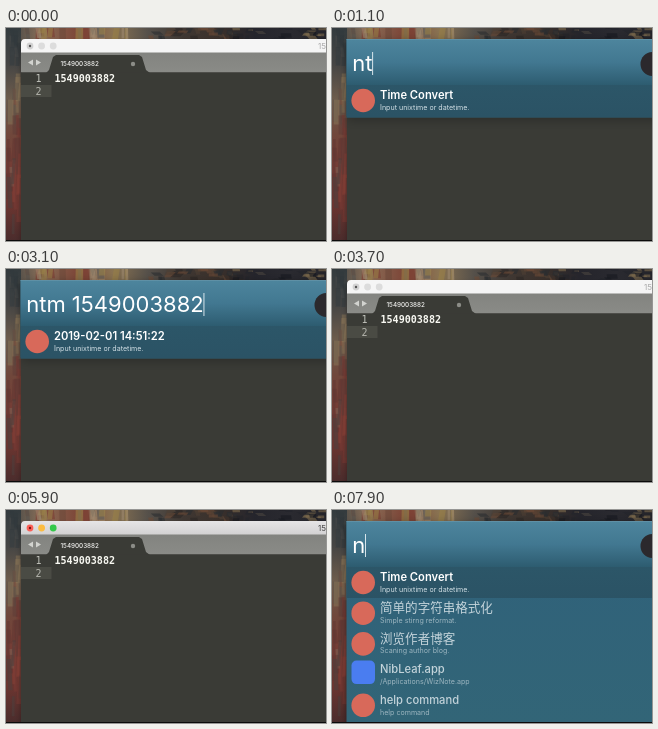
Animation of 320 by 213 pixels, one loop 8000 ms. Source, as an HTML page with a canvas:

```html
<!DOCTYPE html>
<html lang="en">
<head>
<meta charset="utf-8">
<title>Time Convert</title>
<style>
html, body { margin: 0; width: 100%; height: 100%; overflow: hidden; background: #000; }
canvas { display: block; width: 320px; height: 213px; }
</style>
</head>
<body>
<canvas id="stage"></canvas>
<script>
const W = 320, H = 213, LOOP = 8000, STEP = 100;
const SANS = 'Inter, "Noto Sans CJK SC", "Noto Sans CJK", sans-serif';
const MONO = '"DejaVu Sans Mono", monospace';
const STAMP = '1549003882';
const DATE = '2019-02-01 14:51:22';

// Editor events
const FOCUS = 5200, PASTE = 6400, NEWLINE = 7200, BLUR = 7500;

// Each launcher session: fade-in start, closing time, and what stands in the field when
const SESSIONS = [
  { open: 100, close: 3700, keys: [[100, ''], [500, 'n'], [1000, 'nt'], [1300, 'ntm'], [2500, 'ntm ' + STAMP]] },
  { open: 7600, close: LOOP, keys: [[7600, ''], [7900, 'n']] }
];
const CONVERTED = 2900;

const ITEMS = [
  ['Time Convert', 'Input unixtime or datetime.'],
  ['简单的字符串格式化', 'Simple stirng reformat.'],
  ['浏览作者博客', 'Scaning author blog.'],
  ['NibLeaf.app', '/Applications/WizNote.app'],
  ['help command', 'help command']
];

const canvas = document.getElementById('stage');
const dpr = window.devicePixelRatio || 1;
canvas.width = W * dpr;
canvas.height = H * dpr;
const ctx = canvas.getContext('2d');

function rect(x, y, w, h, fill) {
  ctx.fillStyle = fill;
  ctx.fillRect(x, y, w, h);
}

function disc(x, y, r, fill) {
  ctx.fillStyle = fill;
  ctx.beginPath();
  ctx.arc(x, y, r, 0, Math.PI * 2);
  ctx.fill();
}

function poly(fill, ...pts) {
  ctx.fillStyle = fill;
  ctx.beginPath();
  for (let i = 0; i < pts.length; i += 2) ctx.lineTo(pts[i], pts[i + 1]);
  ctx.fill();
}

function text(str, x, y, font, fill) {
  ctx.font = font;
  ctx.fillStyle = fill;
  ctx.fillText(str, x, y);
}

function gradient(x0, y0, x1, y1, colors) {
  const g = ctx.createLinearGradient(x0, y0, x1, y1);
  colors.forEach((c, i) => g.addColorStop(i / (colors.length - 1), c));
  return g;
}

const ramp = (y0, y1, ...colors) => gradient(0, y0, 0, y1, colors);

function random(seed) {
  return () => (seed = seed * 16807 % 2147483647) / 2147483647;
}

// Loose brush strokes, colours picked from a palette
function strokes(rnd, n, x, y, w, h, size, palette) {
  for (let i = 0; i < n; i++) {
    const sx = x + rnd() * w, sy = y + rnd() * h;
    const sw = size[0] * (0.5 + rnd()), sh = size[1] * (0.5 + rnd());
    const lean = (rnd() - 0.5) * sw;
    poly(palette[Math.floor(rnd() * palette.length)],
      sx + lean, sy, sx + sw + lean, sy, sx + sw, sy + sh, sx, sy + sh);
  }
}

function wallpaper() {
  const rnd = random(77);
  rect(0, 0, W, H, '#32302f');
  rect(0, 0, W, 12, gradient(0, 0, W, 0,
    ['#3a4143', '#8a6f58', '#7d4638', '#8a7352', '#55504a', '#3f3732', '#3a302b', '#25252c', '#2a2a30', '#24242a']));
  ctx.globalAlpha = 0.6;
  strokes(rnd, 26, 20, -4, 100, 4, [5, 12], ['#a08a70', '#7c3a30', '#9a8148', '#57544f', '#6d4a3a']);
  strokes(rnd, 30, 118, -4, 110, 12, [7, 5], ['#2b2624', '#4f4034', '#6b4a35', '#2a2d31']);
  strokes(rnd, 26, 225, -3, 95, 12, [7, 3], ['#18191f', '#23242c', '#7d6a4c', '#4a4440']);
  ctx.globalAlpha = 1;
  rect(0, 0, 15, H, ramp(0, H, '#333b3e', '#454544', '#6d5c4c', '#70473b', '#753c35', '#6a3530', '#4a2c2c'));
  ctx.globalAlpha = 0.5;
  strokes(rnd, 8, 0, 0, 13, 30, [5, 18], ['#2f373b', '#474a49']);
  strokes(rnd, 10, 0, 45, 10, 40, [4, 20], ['#8a7658', '#5b5148', '#7a4a3c']);
  strokes(rnd, 12, 6, 75, 8, 80, [4, 30], ['#8c4238', '#7a3a33', '#5c3a35']);
  strokes(rnd, 10, 0, 110, 6, 80, [3, 26], ['#4a403d', '#7d6557', '#5f3532']);
  ctx.globalAlpha = 1;
}

function shade(x, y, w, h, blur, alpha) {
  ctx.save();
  ctx.shadowColor = `rgba(0,0,0,${alpha})`;
  ctx.shadowBlur = blur * dpr;
  ctx.shadowOffsetY = 2 * dpr;
  rect(x, y, w, h, '#3a3b36');
  ctx.restore();
}

function editor(t) {
  const active = t >= FOCUS && t < BLUR;
  const pasted = t >= PASTE;
  const line = t >= NEWLINE ? 3 : 2;
  const rowY = n => 54 + (n - 1) * 12.5;

  shade(16, 14, W, H, 6, 0.45);
  ctx.beginPath();
  ctx.roundRect(15, 11, 320, 20, 4);
  ctx.fillStyle = active ? ramp(11, 25, '#e6e5e6', '#d2d1d2') : '#f5f5f5';
  ctx.fill();
  const lights = active ? ['#fb5f57', '#fcbc40', '#34c84a'] : ['#d2d2d2', '#dcdcdc', '#dcdcdc'];
  lights.forEach((c, i) => disc(24 + i * 11.6, 18, 3.4, c));
  disc(24, 18, 1.2, active ? '#7c1512' : '#555');
  text(STAMP, 312, 21, `8px ${SANS}`, active ? '#444' : '#aaa');

  rect(15, 24.5, W, 20, ramp(24, 44, '#82837f', '#8a8b87'));
  poly('#d2d3cf', 22, 34.5, 27, 31.5, 27, 37.5);
  poly('#d2d3cf', 35, 34.5, 30, 31.5, 30, 37.5);
  poly('#3a3b36', 40, 45, 43, 42, 47, 29, 50, 27, 133, 27, 136, 29, 140, 42, 144, 45);
  text(STAMP, 54.5, 38.3, `500 6.3px ${SANS}`, '#f4f4f2');
  disc(127, 36, 2.2, '#8c8d88');

  rect(15, 44.5, W, 168, '#3a3b36');
  rect(15, rowY(line) - 9.5, 30.5, 12, '#4a4b44');
  for (let n = 1; n <= line; n++) {
    text(n, 29.5, rowY(n), `10px ${MONO}`, n === line ? '#b4b5ae' : '#c3c4bd');
  }
  const code = `bold 10.05px ${MONO}`;
  text(STAMP, 48.5, rowY(1), code, '#f8f8f2');
  if (pasted) text(DATE, 48.5, rowY(2), code, '#f8f8f2');

  const since = t - (t >= NEWLINE ? NEWLINE : pasted ? PASTE : FOCUS);
  if (active && since % 1200 < 600) {
    const x = pasted && line === 2 ? 48.5 + ctx.measureText(DATE).width : 48;
    rect(x, rowY(line) - 9, 0.8, 11, '#8f908a');
  }
}

function listItem([title, note], i) {
  const y = 57 + i * 30.7;
  const first = i === 0;
  if (first) rect(14.5, 57, W, 31, ramp(57, 88, '#2c5668', '#2b5365'));
  if (i === 3) {
    ctx.fillStyle = '#4a7df0';
    ctx.beginPath();
    ctx.roundRect(19.5, y + 1.5, 23.5, 23.5, 5);
    ctx.fill();
  } else {
    disc(31.2, y + 15.5, 11.8, '#d8695a');
  }
  const size = title.charCodeAt(0) > 255 ? 12.55 : 11.2;
  text(title, 48, y + 14.2, `${first ? 600 : 500} ${size}px ${SANS}`, first ? '#fff' : '#c3d3da');
  text(note, 48, y + 24.8, `7.1px ${SANS}`, first ? '#d3e0e6' : '#9db6c0');
}

function panel(t, { open, keys }) {
  const [start, query] = keys.filter(k => t >= k[0]).pop();
  let items = query === 'n' ? ITEMS : query ? ITEMS.slice(0, 1) : [];
  if (t >= CONVERTED && query.endsWith(STAMP)) items = [[DATE, ITEMS[0][1]]];
  const bottom = items.length ? Math.min(212, 59 + items.length * 30.7) : 57;

  ctx.save();
  ctx.globalAlpha = Math.min(1, (t - open + STEP) / 300);
  shade(15, 11, W, bottom - 11, 10, 0.25);
  rect(14.5, 11, W, bottom - 11, items.length > 1 ? ramp(57, 212, '#30627a', '#326577') : '#2b5365');
  rect(14.5, 11, W, 46, ramp(11, 57, '#4d859d', '#427891', '#2d5c70'));
  rect(14.5, 11, W, 0.7, '#6796aa');
  disc(320.5, 36, 12, '#2b292d');
  items.forEach(listItem);

  text(query, 20.2, 42.5, `22px ${SANS}`, '#fff');
  if ((t - start) % 1100 < 700) {
    rect(20 + ctx.measureText(query).width, 24, 0.9, 23, '#e8f2f6');
  }
  ctx.restore();
}

function draw(t) {
  ctx.setTransform(dpr, 0, 0, dpr, 0, 0);
  wallpaper();
  editor(t);
  const session = SESSIONS.find(s => t >= s.open && t < s.close);
  if (session) panel(t, session);
  rect(0, 212, W, 1, '#0b0b0b');
}

const begin = performance.now();
function tick() {
  const t = (performance.now() - begin) % LOOP;
  draw(Math.floor(t / STEP) * STEP);
  requestAnimationFrame(tick);
}
tick();
</script>
</body>
</html>
```
